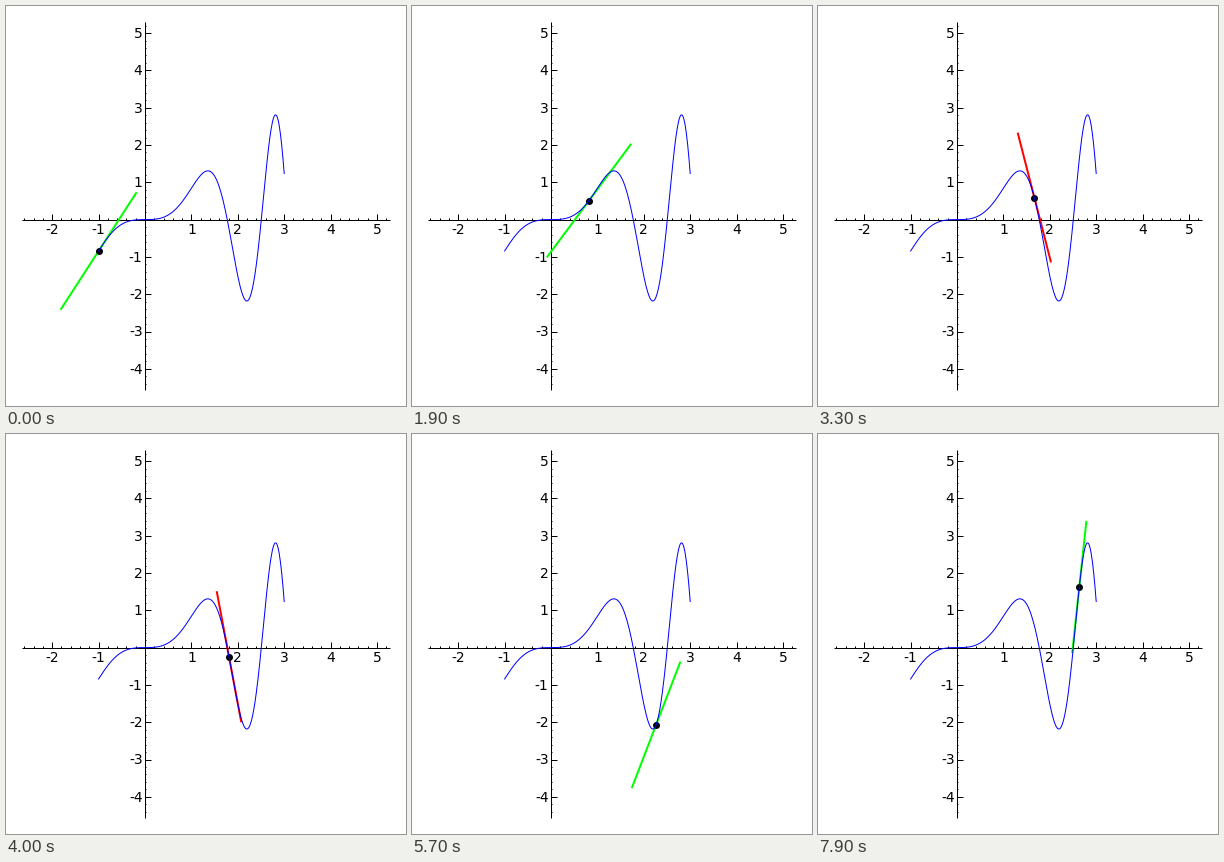
A matplotlib script for the animation above (8000 ms loop, 400 by 400 pixels).

```python
import numpy as np
import matplotlib.pyplot as plt
from matplotlib.animation import FuncAnimation

SIZE, DPI, FRAMES = 400, 100, 80
PX = 72 / DPI                  # one pixel in points
OX, OY = 139.0, 213.6          # origin on the stage
UX, UY = 46.4, 37.3            # pixels per unit
HALF = 1.75                    # half length of the tangent
MAJOR, MINOR = 5.5, 1.4        # tick lengths


def f(x):
    return x * np.sin(x ** 2)


def slope(x):
    return np.sin(x ** 2) + 2 * x ** 2 * np.cos(x ** 2)


def sx(x):
    return OX + UX * x


def sy(y):
    return OY - UY * y


# The point travels along the curve by arc length, with a few pace changes.
grid = np.linspace(-1, 3, 8001)
arc = np.concatenate([[0], np.cumsum(np.hypot(np.diff(grid), np.diff(f(grid))))])
pace = np.array([
    (0, -1), (8, -0.308), (9, -0.208), (19, 0.82), (27, 1.357),
    (33, 1.667), (36, 1.732), (45, 1.9), (49, 1.965), (54, 2.104),
    (56, 2.193), (63, 2.395), (66, 2.4475), (72, 2.544), (79, 2.636),
])
travelled = np.interp(np.arange(FRAMES), pace[:, 0], np.interp(pace[:, 1], grid, arc))
path = np.interp(travelled, arc, grid)

fig = plt.figure(figsize=(SIZE / DPI, SIZE / DPI), dpi=DPI, facecolor="white")
ax = fig.add_axes([0, 0, 1, 1])
ax.set_xlim(0, SIZE)
ax.set_ylim(SIZE, 0)
ax.axis("off")


def rule(x0, y0, x1, y1):
    ax.plot([x0, x1], [y0, y1], color="black", lw=PX, snap=True,
            solid_capstyle="butt", zorder=1)


def label(x, y, k, ha):
    ax.text(x, y, str(k), ha=ha, va="baseline", fontsize=10,
            family="DejaVu Sans", color="black", zorder=1)


rule(16.2, OY, 383.8, OY)
rule(OX, 16.2, OX, 383.8)

for i in range(-13, 27):
    rule(sx(i / 5), OY, sx(i / 5), OY - (MINOR if i % 5 else MAJOR))
for i in range(-22, 27):
    rule(OX, sy(i / 5), OX + (MINOR if i % 5 else MAJOR), sy(i / 5))

for k in range(-4, 6):
    if k == 0:
        continue
    if k >= -2:
        label(sx(k), OY + 14.9, k, "center")
    label(OX - 2.5, sy(k) + 4.9, k, "right")

tangent, = ax.plot([], [], lw=2 * PX, zorder=3)
dot, = ax.plot([], [], "o", color="black", ms=7 * PX, mew=0, zorder=4)
xs = np.linspace(-1, 3, 300)
ax.plot(sx(xs), sy(f(xs)), color="blue", lw=PX, zorder=5)


def draw(i):
    x = path[i]
    y, m = f(x), slope(x)
    dx = HALF / np.hypot(1, m)
    ends = np.array([-dx, dx])
    tangent.set_data(sx(x + ends), sy(y + m * ends))
    tangent.set_color("lime" if m > 0 else "red")
    dot.set_data([sx(x)], [sy(y)])
    return tangent, dot


anim = FuncAnimation(fig, draw, frames=FRAMES, interval=100, repeat=True, repeat_delay=0)
plt.show()
```
